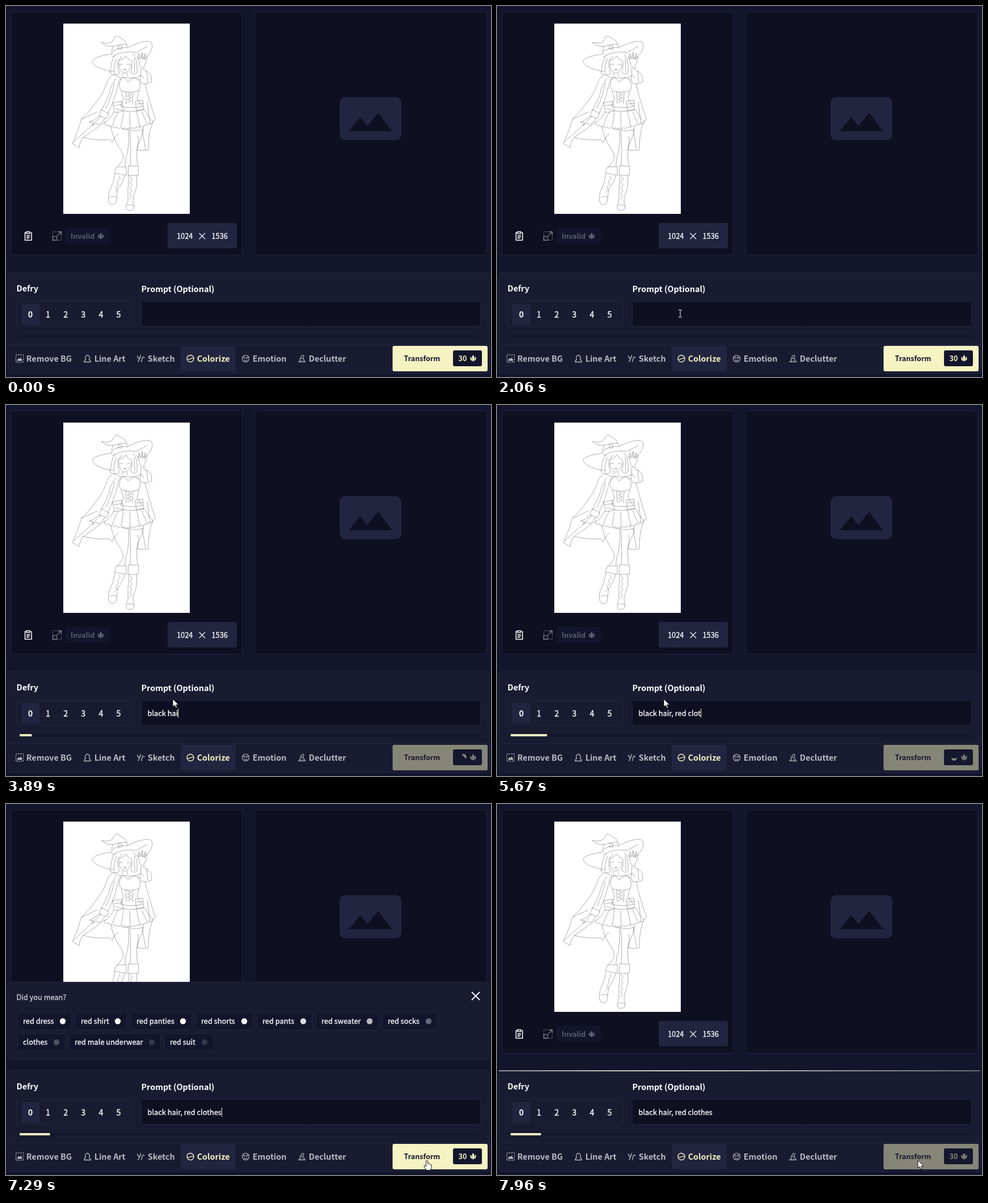
Write an HTML page with a canvas that moves like this. It is 855x655 px and loops after 7990 ms.

```html
<!DOCTYPE html>
<html lang="en">
<head>
<meta charset="utf-8">
<title>Colorize tool</title>
<style>
html, body { margin: 0; width: 100%; height: 100%; overflow: hidden; background: #13152c; }
canvas { display: block; }
</style>
</head>
<body>
<canvas id="stage" width="855" height="655"></canvas>
<script>
const c = document.getElementById('stage').getContext('2d');
const LOOP = 7990;
const BG0 = '#0e0f21', BG1 = '#13152c', BG2 = '#191b31', BG3 = '#22253f', GOLD = '#f5f3c2';
const SOFT = 'rgba(255,255,255,.7)';
const FONT = '"Noto Sans CJK JP", "Noto Sans CJK SC", "Noto Sans CJK", "Open Sans", sans-serif';
const BODY = 12.8, SMALL = 12.55, LARGE = 14.35;

const clamp = x => Math.max(0, Math.min(1, x));
const ramp = (t, from, ms) => clamp((t - from) / ms);

function box(x, y, w, h, fill, border, r = 3) {
  c.beginPath();
  if (border) c.roundRect(x + .5, y + .5, w - 1, h - 1, r);
  else c.roundRect(x, y, w, h, r);
  if (fill) { c.fillStyle = fill; c.fill(); }
  if (border) { c.strokeStyle = border; c.lineWidth = 1; c.stroke(); }
}
function text(s, x, y, size, color = '#fff', weight = 400, align = 'left') {
  c.font = `${weight} ${size}px ${FONT}`;
  c.textAlign = align;
  c.fillStyle = color;
  c.fillText(s, x, y);
}
// Regular weight with a hairline outline, close to a medium cut
function medium(s, x, y, size, color = '#fff', align = 'left') {
  text(s, x, y, size, color, 400, align);
  c.strokeStyle = color;
  c.lineWidth = .3;
  c.strokeText(s, x, y);
}
function stroke(d, color, width = 1.3) {
  c.strokeStyle = color;
  c.lineWidth = width;
  c.stroke(new Path2D(d));
}
function fill(d, color) {
  c.fillStyle = color;
  c.fill(new Path2D(d));
}
function at(x, y, draw) {
  c.save();
  c.translate(x, y);
  draw();
  c.restore();
}
function faded(alpha, draw) {
  c.save();
  c.globalAlpha *= alpha;
  draw();
  c.restore();
}

// Line drawing
const hat = 'M168 64Q180 68 188 62Q192 52 196 53Q203 57 209 61Q213 67 215 73' +
  'M168 64Q176 73 189 71Q185 78 187 85M189 72Q201 66 213 68M188 80Q202 71 215 74' +
  'M198 70h6v6h-6zM187 85C168 87 152 92 152 98C155 107 170 113 190 116' +
  'M215 73C235 63 254 59 257 66C260 77 252 88 240 94M187 90Q205 78 230 82L249 71';
const head = 'M193 87C185 95 186 108 183 118Q188 123 196 121Q201 121 199 115Q195 104 199 96Q207 95 211 88' +
  'Q215 95 222 98Q223 109 220 117Q226 123 231 118C231 106 232 94 224 85' +
  'M199 100Q198 114 209 119Q219 115 221 102M200 104q3-3 6 0M213 104q3-3 6 0M207 112q3 3 5 0z' +
  'M195 92Q189 106 191 119M204 88Q202 93 197 98M226 92L227 118M205 118v6M214 118v6';
const raisedArm = 'M236 106L234 96L231 89L235 94L234 84L238 93L240 82L241 93L246 84L244 95' +
  'L249 89L246 101L242 108M236 106Q243 113 246 108M242 112Q252 116 256 123L257 134Q248 139 239 137' +
  'M238 109L237 122Q235 130 239 137M248 114L250 135';
const cape = 'M190 120Q198 128 209 126Q226 130 239 122L243 128M188 122Q179 128 177 138Q170 157 158 171' +
  'Q146 188 133 200Q127 222 117 243L129 250Q130 239 136 232Q158 238 183 236L187 241Q191 231 198 226' +
  'M245 137Q251 163 262 196Q266 201 259 204Q250 226 251 254Q241 256 231 254Q235 241 232 229' +
  'M133 200Q148 193 161 187M168 194Q150 213 119 240M175 204Q156 219 136 232M249 170L254 208M240 218L246 253';
const leftArm = 'M194 128Q184 140 181 158L168 185M199 132Q195 151 189 168L180 190' +
  'M168 183L181 190L177 199L164 194ZM165 194L154 202L147 205L154 206L152 211L159 207L164 210Q172 204 174 198' +
  'M191 136Q188 156 176 181';
const torso = 'M203 128Q196 142 204 150Q221 155 235 149Q239 136 232 128M199 131L208 126L215 134L226 126L235 131' +
  'M203 150L207 164L202 177M234 150L231 164L241 178M211 151L212 173M224 152L223 173M202 177Q221 182 241 177' +
  'M188 171L204 168L207 186L191 188ZM190 176L205 174M228 168L241 166L243 183L230 185ZM230 173L242 172' +
  'M193 181Q215 190 244 183';
const skirt = 'M190 187Q184 200 173 207M245 184Q250 196 259 204M198 187Q190 201 188 211M207 188L203 214' +
  'M218 188L219 216M230 186L236 214M239 186L249 209';
const legs = 'M185 212Q187 230 199 249Q209 262 206 272L197 284M216 217Q218 239 214 260Q209 274 210 284' +
  'M218 217Q221 246 219 282M243 213Q241 230 232 245Q229 262 232 282M205 215Q209 220 216 218M220 219Q232 222 242 217';
const boots = 'M195 284L212 284L212 299L191 295ZM192 296Q190 313 182 328Q178 345 184 350Q192 352 194 346' +
  'L197 323Q207 311 209 299M183 338Q190 334 196 338M216 282L234 283L233 299L215 299Z' +
  'M217 299Q214 322 215 344Q208 358 216 361Q227 361 226 354Q222 344 226 333Q233 316 230 299M213 352Q221 349 226 354';

function zigzag(x, y, w, dx, dy, n) {
  let d = `M${x} ${y}`;
  for (let i = 1; i < n; i++) d += `L${x + dx * i + (i % 2) * w} ${y + dy * i}`;
  return d;
}
function frill() {
  let d = 'M173 207';
  for (let i = 1; i <= 12; i++) {
    const u = i / 12;
    d += `Q${173 + 86 * (u - .04)} ${211 + 36 * u * (1 - u)} ${173 + 86 * u} ${207 - 3 * u + 36 * u * (1 - u)}`;
  }
  return d;
}
const laces = zigzag(214, 153, 7, 0, 3, 7) + zigzag(199, 300, 4, -1.4, 5, 7) + zigzag(219, 301, 4, -.2, 5, 9);
const art = [hat, head, raisedArm, cape, leftArm, torso, skirt, legs, boots, laces, frill()].join('');

// Icons, drawn around their centre
function petals(x, y, color) {
  at(x, y, () => fill('M0-6Q4-1 .6 5.5H-.6Q-4-1 0-6ZM-4.6-3Q-2.4-1-1.6 5Q-6.6 2-4.6-3ZM4.6-3Q2.4-1 1.6 5Q6.6 2 4.6-3Z', color));
}
function dashedSquare(r, color) {
  c.save();
  c.setLineDash([2, 2]);
  stroke(`M${-r} ${-r}h${2 * r}v${2 * r}h${-2 * r}z`, color);
  c.restore();
}
const tabs = [
  ['Remove BG', 24, 36, k => { dashedSquare(6.5, k); fill('M-5 4L-2-1L0 1L2-2L5 4Z', k); }],
  ['Line Art', 143.5, 156, k => stroke('M-5.5 6Q-6 3-3 2Q-4.5-1-3.5-3.5Q0-8.5 3.5-3.5Q4.5-1 3 2Q6 3 5.5 6Z', k)],
  ['Sketch', 237.5, 250, k => stroke('M-6-5Q-5 0-2 0L0-6Q-2 2-5 6M1 6L3-2Q5-4 6.5-1M3-2L2 2', k)],
  ['Colorize', 325, 337, k => stroke('M6 0A6 6 0 1 1-6 0A6 6 0 1 1 6 0M-6 .5Q-3 2.5 0 .5T6 0', k)],
  ['Emotion', 422.5, 435, k => stroke('M6 0A6 6 0 1 1-6 0A6 6 0 1 1 6 0M-5-3Q0 0 5-3M-2.5-.5v1.5M2.5-.5v1.5M-2.5 3Q0 4.5 2.5 3', k, 1.2)],
  ['Declutter', 522, 534, k => stroke('M-6 6Q-3 3-3-1L2 0L5.5 6ZM-2-1Q-2-5 1-6L3-5L2-1M-2 3L-3 6M1 3L2 6', k, 1.1)]
];

function panels() {
  c.fillStyle = BG1;
  c.fillRect(0, 0, 855, 655);
  box(8, 10, 409, 430, BG0, BG3);
  box(438, 10, 410, 430, BG0, BG3);

  c.fillStyle = '#fff';
  c.fillRect(101, 31, 223, 336);
  stroke(art, 'rgba(30,30,30,.6)', .6);

  box(588, 161, 109, 76, BG3, null, 10);
  fill('M604.5 221L624.5 196.5L637 212L656 188.5L680.5 221Z', BG0);

  at(39, 406, () => {
    stroke('M-4-6h-1.5v13.5h11.5v-13.5h-1.5M-3-7.5h6v3h-6zM-2.8-.8h6M-2.8 1.7h6M-2.8 4.2h4', '#fff', 1.5);
  });
  at(90, 406, () => {
    const k = 'rgba(255,255,255,.38)';
    dashedSquare(7.5, k);
    stroke('M-7.5 1h7v6.5h-7zM0 0L7-7M2-7.2h5.2v5.2', k, 1.5);
  });
  box(105, 392, 78, 28, BG1);
  text('Invalid', 114, 411, SMALL, 'rgba(255,255,255,.3)', 700);
  petals(167, 406, 'rgba(255,255,255,.35)');
  box(285, 383, 122, 45, BG3);
  medium('1024', 301, 411, BODY);
  medium('1536', 362.5, 411, BODY);
  stroke('M340.5 401l10.5 10.5M351 401l-10.5 10.5', '#fff', 1.1);
}

function controls() {
  box(3, 470, 850, 179, BG2, BG3);
  text('Defry', 18.5, 504, LARGE, '#fff', 700);
  text('Prompt (Optional)', 238.5, 505, LARGE, '#fff', 700);
  box(18, 521, 205, 45, null, BG3);
  box(27, 526, 32, 37, BG3);
  text('0', 43, 550, LARGE, '#fff', 700, 'center');
  for (let i = 1; i < 6; i++) medium(i, 43 + 31.1 * i, 550, LARGE, '#fff', 'center');
  box(238, 521, 599, 45, BG0, BG3);
  box(24, 581, 807, 4, BG1, null, 1);
  c.fillStyle = BG3;
  c.fillRect(4, 597, 848, 1);
  box(308, 600, 97, 45, BG3);
  for (const [name, ix, tx, icon] of tabs) {
    const color = name === 'Colorize' ? GOLD : SOFT;
    at(ix, 622.5, () => icon(color));
    text(name, tx - .3, 628, LARGE, color, 700);
  }
}

// Typing
const PROMPT = 'black hair, red clothes';
const typeTime = i => i < 12 ? 2800 + 134 * i : 4725 + 134 * (i - 12);
const typedAt = t => [...PROMPT].filter((_, i) => t >= typeTime(i)).length;
function tokens(n) {
  if (n < 7) return n ? 1 : 0;
  if (n < 11) return 2;
  if (n < 13) return 3;
  if (n < 17) return 4;
  return n === 20 || n === 22 ? 6 : 5;
}
function promptField(t) {
  const n = typedAt(t), s = PROMPT.slice(0, n);
  medium(s, 249.5, 549, BODY);
  const caretX = 249.5 + c.measureText(s).width;
  const blink = t < 6075 || Math.floor((t - 6075) / 530) % 2 === 0;
  if (t > 2250 && t < 7480 && blink) {
    c.fillStyle = GOLD;
    c.fillRect(Math.round(caretX), 536, 1, 16);
  }
  if (n) box(24, 581, 10.72 * tokens(n), 4, GOLD, null, 1);
}

function transformButton(t) {
  const loading = t > 2830 && t < 6290;
  const dim = ramp(t, 2830, 120) - ramp(t, 6220, 120) + ramp(t, 7480, 120);
  box(681.5, 600, 167.5, 45, GOLD);
  text('Transform', 701.5, 627, SMALL, BG1, 700);
  box(788, 608, 51, 28, BG1);
  petals(823.5, 622, GOLD);
  if (!loading) text('30', 797.5, 627, SMALL, GOLD, 700);
  else at(806, 622, () => {
    c.rotate(((t - 5670) * .48 + 90) * Math.PI / 180);
    fill('M1-5A5 5 0 0 1 1 5Q3 0 1-5Z', GOLD);
  });
  if (dim) faded(dim * .5, () => box(681, 600, 168, 45, BG2));
}

// Suggestions: label, x, width, dot strength
const rows = [
  [['red dress', 20, 96, 1], ['red shirt', 122, 91, 1], ['red panties', 220, 108, 1], ['red shorts', 334, 102, 1],
   ['red pants', 442, 98, .85], ['red sweater', 546, 111, .7], ['red socks', 663, 98, .35]],
  [['clothes', 20, 85, .25], ['red male underwear', 111, 162, .14], ['red suit', 279, 87, .14]]
];
function suggestions(t) {
  const show = ramp(t, 6590, 200), hide = ramp(t, 7480, 220);
  const alpha = show * (1 - hide);
  if (!alpha) return;
  const ready = t > 6860;
  faded(alpha, () => at(0, 13 * (1 - show) + 13 * hide, () => {
    box(3, 314, 849, ready ? 138 : 111, BG2, BG3);
    medium('Did you mean?', 18.5, 346, BODY, 'rgba(255,255,255,.75)');
    stroke('M821 332l14 14M835 332l-14 14', '#fff', 1.8);
    if (!ready) {
      const a = (t - 6680) * .006;
      c.beginPath();
      c.arc(429.5, 379, 12.5, a - 2.4, a + 1.25);
      c.strokeStyle = '#fff';
      c.lineWidth = 3;
      c.stroke();
      return;
    }
    rows.forEach((row, j) => row.forEach(([label, x, w, dot]) => {
      const y = 368 + 37 * j;
      box(x, y, w, 31, BG1, BG3);
      medium(label, x + 10, y + 20, BODY);
      c.fillStyle = `rgba(255,255,255,${dot})`;
      c.beginPath();
      c.arc(x + w - 16, y + 15.5, 5.2, 0, 7);
      c.fill();
    }));
  }));
}

function workLine(t) {
  const a = ramp(t, 7520, 300);
  if (!a) return;
  const g = c.createLinearGradient(3, 0, 852, 0);
  g.addColorStop(0, 'rgba(245,243,225,.55)');
  g.addColorStop(.35, 'rgba(245,243,225,.85)');
  g.addColorStop(1, 'rgba(245,243,225,.35)');
  faded(a, () => {
    c.fillStyle = g;
    c.fillRect(3, 470, 849, 2);
  });
}

// Pointer path: time, x, y, easing used to get there
const easeIn = p => p ** 1.6, easeOut = p => 1 - (1 - p) ** 2, smooth = p => p * p * (3 - 2 * p), cut = p => p < 1 ? 0 : 1;
const path = [
  [230, 868, 138, cut], [1020, 366, 628, smooth], [1250, 364, 629, smooth], [1840, 325, 567, smooth],
  [2060, 323, 543, smooth], [2220, 323, 543, cut], [2310, 294, 515, smooth], [2590, 294, 519, cut],
  [6250, 294, 519, cut], [6340, 330, 533, smooth], [6480, 330, 533, cut], [6680, 542, 541, easeIn],
  [7260, 738, 627, easeOut], [7290, 742, 629, cut]
];
function pointerAt(t) {
  const i = path.findIndex(k => k[0] > t);
  if (i < 0) return path[path.length - 1].slice(1, 3);
  if (!i) return null;
  const [t0, x0, y0] = path[i - 1], [t1, x1, y1, ease] = path[i];
  const e = ease((t - t0) / (t1 - t0));
  return [x0 + (x1 - x0) * e, y0 + (y1 - y0) * e];
}
function outlined(d) {
  fill(d, '#fff');
  stroke(d, '#000', .9);
}
function pointer(t) {
  const p = pointerAt(t);
  if (!p) return;
  const [x, y] = p;
  const inside = (l, top, r, b) => x >= l && x <= r && y >= top && y <= b;
  const field = inside(238, 521, 837, 566);
  const button = inside(8, 600, 608, 645) || (inside(681, 600, 849, 645) && t < 7500);
  at(Math.round(x), Math.round(y), () => {
    if (field) stroke('M-3-6.5h2.5M.5-6.5h2.5M-3 6.5h2.5M.5 6.5h2.5M0-6v12', '#fff', 1);
    else if (button) outlined('M-1.5 1Q0-1 1.5 1V6Q3 5 4 6.5Q5.5 6 6 7.5Q8 7 8 9V13L6.5 17.5H-1L-5 11Q-5.5 8.5-3 9.5L-1.5 11Z');
    else outlined('M0 0V14L3.3 11L5.6 16L7.8 15L5.6 10.3H10.2Z');
  });
}

function draw(t) {
  panels();
  suggestions(t);
  controls();
  promptField(t);
  transformButton(t);
  workLine(t);
  pointer(t);
}
const start = performance.now();
function tick() {
  draw((performance.now() - start) % LOOP);
  requestAnimationFrame(tick);
}
tick();
</script>
</body>
</html>
```
